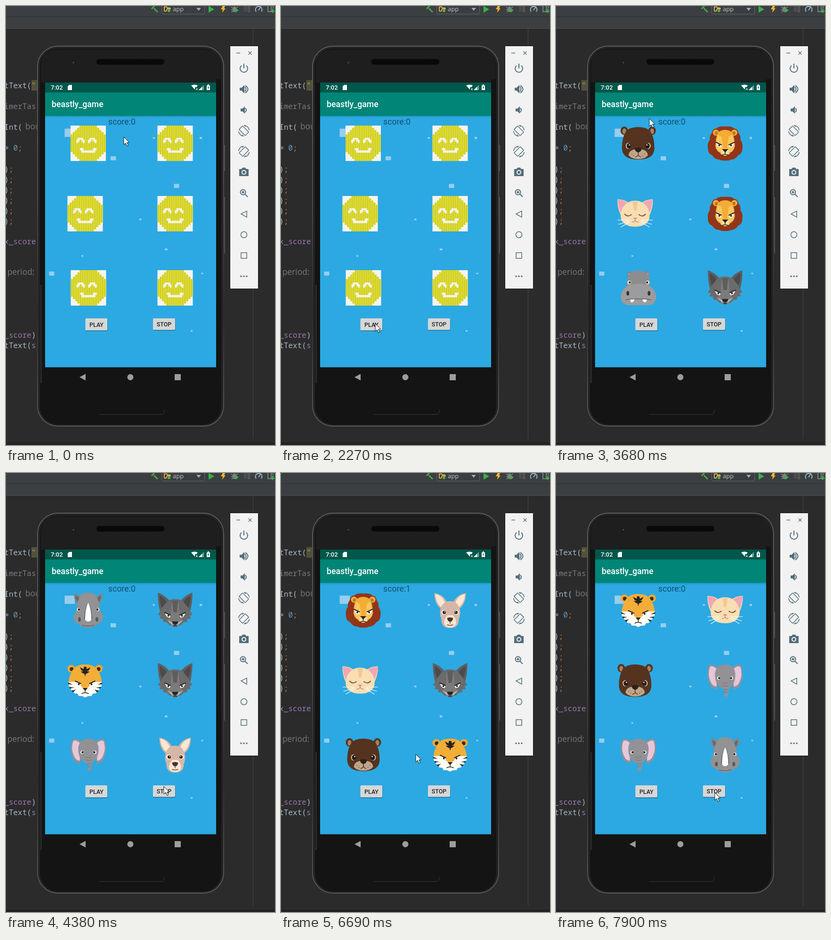
These frames come from a looping animation (571x929 px, 8 s). An HTML page:

```html
<!DOCTYPE html>
<html lang="en">
<head>
<meta charset="utf-8">
<title>Animal faces</title>
<style>
html, body { margin: 0; width: 100%; height: 100%; overflow: hidden; background: #2b2b2b; }
svg { display: block; }
.code { font: 16px "Noto Sans Mono", monospace; fill: #a9b7c6; white-space: pre; }
.hint { font: 17.3px "Open Sans", sans-serif; fill: #787878; }
.key { fill: #cc7832; }
.var { fill: #9876aa; }
.app { font: 500 13px Roboto, sans-serif; }
</style>
</head>
<body>
<svg width="571" height="929" viewBox="0 0 571 929">
  <defs>
    <linearGradient id="edge" x2="0" y2="1">
      <stop stop-color="#5c5c5c"/><stop offset=".4" stop-color="#4c4c4c"/>
      <stop offset=".7" stop-color="#2c2c2c"/><stop offset="1" stop-color="#5a5a5a"/>
    </linearGradient>
    <linearGradient id="shade" x2="0" y2="1">
      <stop stop-color="#2492bd"/><stop offset="1" stop-color="#2ca9e2"/>
    </linearGradient>
    <pattern id="stripes" width="4.7" height="75" patternUnits="userSpaceOnUse">
      <path fill="#dfdc2a" d="M0 0h5v75H0z"/><path fill="#c9c73a" d="M1 0h1.6v75H1z"/>
    </pattern>
    <pattern id="mesh" width="4" height="4" patternUnits="userSpaceOnUse">
      <path fill="#070707" d="M0 0h4v4H0z"/><path fill="#1c1c1c" d="M0 0h1v1H0zM2 2h1v1H2z"/>
    </pattern>
    <path id="rotate" fill="#546e7a" fill-rule="evenodd" d="M16.500 2.500c3.300 1.600 5.600 4.700 6 8.500H24C23.400 4.800 18.300 0 12 0h-.7l3.800 3.800zM10.200 1.700q-1-.9-2.100 0L1.700 8.100q-.9 1 0 2.100l12 12q1 .9 2.100 0l6.400-6.400q.9-1 0-2.100zM14.800 21.200L2.800 9.200l6.400-6.400 12 12zM7.500 21.500C4.200 19.900 1.900 16.800 1.500 13H0c.6 6.200 5.700 11 12 11h.7l-3.800-3.800z"/>
    <g id="symbols"></g>
  </defs>

  <!-- editor -->
  <path fill="#2b2b2b" d="M0 0h571v929H0z"/>
  <path fill="#3c3f41" d="M0 0h571v47H0z"/>
  <path fill="#2d2f30" d="M0 22h571v1H0z"/>
  <path fill="#515151" d="M0 47h571v1H0z"/>
  <path fill="#484848" d="M524 48h1v868h-1z"/>
  <path fill="#232323" d="M0 924h571v5H0z"/>
  <path fill="#53503a" d="M54 157h14v22H54z"/>
  <g id="code" class="code"></g>
  <text class="hint" x="41" y="261">bou</text>
  <text class="hint" x="3" y="569">period:</text>

  <!-- toolbar -->
  <rect x="330.5" y="-6" width="91" height="23" rx="3" fill="#3b3e40" stroke="#646768"/>
  <path fill="none" stroke="#d8a84e" stroke-width="2" d="M336 11V2h5l2 2h5v3M336 11h4l2-5h8"/>
  <circle cx="346" cy="10" r="3" fill="#4caf50"/>
  <text x="354" y="11" fill="#c4c7c9" style="font:13px 'Open Sans',sans-serif">app</text>
  <path fill="#a7aaac" d="M404 4h10l-5 6z"/>
  <path stroke="#49a64b" stroke-width="3" fill="none" d="M322 13l-8-8M309 6l6-6"/>
  <path fill="#35b34a" d="M430 0l12 7-12 7z"/>
  <path fill="#f5b52b" d="M460 0h5l-2 5h3l-7 9 1-7h-4z"/>
  <g fill="none" stroke="#8c9794" stroke-width="1.5">
    <path d="M478 2l4 3M478 8h4M479 13l4-3M492 2l-4 3M492 8h-4"/>
    <path stroke="#666" d="M505 2h6M505 6h6M505 10h6M514 0v12h3V0"/>
    <path stroke="#92b5c8" stroke-width="2" d="M531 12a7 7 0 1 1 11 0M536 9l4-6"/>
    <path d="M556 0v12h7V0M567 0v5"/>
  </g>
  <ellipse cx="485" cy="7" rx="4" ry="6" fill="#77867a"/>
  <path fill="#35b34a" d="M487 5l7 4-7 5zM565 6h3v4h3l-5 5-5-5h4z"/>

  <!-- phone -->
  <path fill="#4e4e4e" d="M463 294h2v55h-2zM463 404h2v120h-2z"/>
  <rect x="67" y="85" width="395" height="804" rx="43" fill="#232323" stroke="url(#edge)" stroke-width="2"/>
  <rect x="72" y="90" width="385" height="796" rx="39" fill="#141414"/>
  <path fill="#1e1e1e" d="M74 162v-31q0-39 39-39h304q39 0 39 39v24h-10v7z"/>
  <path fill="#2b2b2b" d="M73 590h3v208h-3z"/>
  <rect x="192" y="112" width="144" height="12" rx="5" fill="url(#mesh)"/>
  <circle cx="143" cy="120" r="1.5" fill="#555"/>
  <path fill="none" stroke="#3a3a3a" d="M198 864.500h132q6 0 6-10"/>
  <g fill="#9d9d9d">
    <path d="M156 785.500l13-7v14zM358 779h13v13h-13z"/><circle cx="264" cy="785.500" r="6.500"/>
  </g>

  <!-- app -->
  <path fill="#2ca9e2" d="M83 232h363v532.500H83z"/>
  <path fill="url(#shade)" d="M83 232h363v5H83z"/>
  <path fill="#00574b" d="M83 162h363v21H83z"/>
  <path fill="#008577" d="M83 183h363v49.500H83z"/>
  <g fill="#fff">
    <text class="app" x="95" y="177">7:02</text>
    <path d="M134 167h6v11h-9v-8zM393 168q7-3 14 0l-3 4h-3v5zM426 168h2v-2h3v2h2v10h-7z"/>
    <path d="M409 178l11-11v11z" opacity=".45"/><path d="M409 178l7-7v7z"/>
    <path stroke="#fff" d="M403 174l4 4M407 174l-4 4"/>
    <path fill="#00574b" d="M430 169l-2 4h1v3l2-4h-1z"/>
    <text x="97" y="214" style="font:500 17.7px Roboto,sans-serif">beastly_game</text>
  </g>
  <path fill="#98cdee" d="M124.500 259.500h21.500v17.500h-21.500zM222 318h11.500v8.500H222zM356.500 376.500h11v8.500h-11zM311.500 277.500h4.500v3.500h-4.500zM411 277h5v4.500h-5zM283 450h4.500v3.500H283zM337 513h5.500v4H337zM160 527.500h4v3h-4zM91.500 562h11v8.500h-11zM414.500 564.500h4v3h-4zM392 686h4v3h-4z"/>
  <text id="score" x="217" y="251" fill="#145071" style="font:17.7px Roboto,sans-serif"></text>
  <g id="faces"></g>
  <g class="app" text-anchor="middle" style="font-size:12.500px">
    <rect x="169" y="662" width="46.500" height="26" rx="2" fill="#1b6d94"/>
    <rect x="168.500" y="661" width="46.500" height="25.500" rx="2" fill="#d6d7d7"/>
    <rect x="312.500" y="662" width="47" height="25" rx="2" fill="#1b6d94"/>
    <rect x="312" y="661" width="47" height="24.500" rx="2" fill="#d6d7d7"/>
    <text x="192" y="679" fill="#222">PLAY</text><text x="335.500" y="678" fill="#222">STOP</text>
  </g>

  <!-- emulator controls -->
  <path fill="#f2f2f2" stroke="#161616" d="M475.500 84.500h60v514h-60z"/>
  <g fill="none" stroke="#546e7a" stroke-width="2">
    <path stroke-width="1.300" d="M489 99.500h8M514.500 96l7 7M521.500 96l-7 7"/>
    <path d="M500 126a8 8 0 1 0 10 0M505 122v10"/>
    <path d="M507 171q5 5 0 10M508 168q11 8 0 16M508 216q4 4 0 9"/>
    <circle cx="503" cy="394" r="5.500"/><path d="M507 398l6 6M500 394h6M503 391v6"/>
    <path stroke-width="1.500" d="M511 434v13l-12-7zM499 522h12v12h-12z"/>
    <circle cx="505" cy="484" r="6.500" stroke-width="1.500"/>
  </g>
  <use href="#rotate" x="493" y="252"/>
  <use href="#rotate" transform="matrix(-1 0 0 1 517 296)"/>
  <g fill="#546e7a">
    <path d="M496 173h4l6-6v18l-6-6h-4zM498 217h4l5-5v16l-5-5h-4zM495 345h5l2-3h6l2 3h5v15h-20z"/>
    <circle cx="499" cy="572" r="1.800"/><circle cx="505" cy="572" r="1.800"/><circle cx="511" cy="572" r="1.800"/>
  </g>
  <circle cx="505" cy="352" r="4" fill="#546e7a" stroke="#f2f2f2" stroke-width="2"/>
  <path id="cursor" fill="#fff" stroke="#111" d="M0 0v16.500l4-3.500 3 6.500 2.700-1.200-3-6.300h5z"/>
</svg>
<script>
const $ = id => document.getElementById(id);
const shape = (fill, d) => `<path fill="${fill}" d="${d}"/>`;
const oval = (fill, x, y, rx, ry = rx) => `<ellipse fill="${fill}" cx="${x}" cy="${y}" rx="${rx}" ry="${ry}"/>`;
const line = (color, d, w = 1.5) => `<path fill="none" stroke="${color}" stroke-width="${w}" d="${d}"/>`;
const pair = s => s + `<g transform="matrix(-1 0 0 1 75 0)">${s}</g>`;

// Disc built from a 16-row grid
let disc = '';
for (let i = 0; i < 16; i++) {
  const half = Math.round(Math.sqrt(70 - (i - 7.5) ** 2)) * 4.69;
  disc += `M${37.5 - half} ${i * 4.69}h${half * 2}v4.75h${-half * 2}z`;
}

// Angry eye with brow, left side
const glare = (x, y) => shape('#fff', `M${x} ${y}l12 6-2 4q-8 0-10-10z`) +
  oval('#222', x + 7, y + 6, 2) + line('#2b211c', `M${x - 1} ${y - 1}l13 6`, 2);

// Every face fills a 75 x 75 box
const art = {
  smile: shape('#f4f4ef', 'M0 0h75v75H0z') + shape('url(#stripes)', disc) +
    line('#f4f4e6', 'M14 37v-5h3v-4h8v4h3v5M39 37v-5h3v-4h8v4h3v5', 4) +
    line('#f4f4e6', 'M20 50h5v5h25v-5h5', 5),
  lion: shape('#933519', 'M37.500 2Q52 1 56 6q8 0 10 10 5 6 4 14 6 8 4 19 0 10-9 14-6 9-15 9-6 3-12.500 2-6.500 1-12.500-2-9 0-15-9-9-4-9-14-2-11 4-19-1-8 4-14Q11 6 19 6q4-5 18.500-4z') +
    pair(oval('#f2ad35', 18, 15, 6.5) + oval('#b87527', 19, 16, 3.5)) +
    shape('#f2ad35', 'M22 15q7-6 15.500-6T53 15q5 12 5 28-2 11-9 14-4 7-11.500 7T26 57q-7-3-9-14 0-16 5-28z') +
    pair(shape('#f9c65f', 'M22 19l8 5 3 23-6 10q-8-3-10-14z')) +
    pair(glare(18, 36)) + shape('#f8dca5', 'M28 53l9.500-3 9.500 3-2 8-7.500 3-7.500-3z') +
    shape('#2b211c', 'M31 50h13l-6.500 7z') + line('#2b211c', 'M37.500 55v5M30 63q7-4 15 0'),
  hippo: pair(oval('#858587', 18, 8, 4, 6) + oval('#c2a7a8', 18, 9, 1.7, 3)) +
    shape('#8d8d8f', 'M18 8q19-15 39 0 5 12 6 28H12q1-16 6-28z') +
    shape('#9c9b9d', 'M17 32q20-6 41 0 17 9 17 25-1 17-18 17H18Q1 74 0 57q0-16 17-25z') +
    pair(oval('#e9e6e2', 18, 26, 4) + oval('#222', 19, 26, 2.2) + oval('#343436', 15, 49, 3, 5) +
      shape('#fff', 'M20 62l9-1q-1 7-5 7t-4-6z')) +
    line('#636264', 'M10 63q13-3 27.500-2Q52 60 65 63'),
  wolf: pair(shape('#5f5f60', 'M1 0q15 5 27 20L6 42Q0 19 1 0z') + shape('#4b4b4c', 'M5 6q9 5 16 15L9 32Q4 18 5 6z')) +
    shape('#6b6b6c', 'M21 18q16-9 33 0l11 14 9 15-6 2 3 6-8 1 0 6-8 1-5 6-7 1-5.500 4-5.500-4-7-1-5-6-8-1 0-6-8-1 3-6-6-2 9-15z') +
    shape('#7b7b7c', 'M30 20h15l2 27 7 13-9 9-7.500 5-7.500-5-9-9 7-13z') +
    shape('#5d5d5e', 'M31 17h13l-3 25h-7z') + pair(glare(16, 43) + shape('#b8b8b9', 'M20 58l11 5 2 7z')) +
    shape('#262627', 'M31 61h13q-1 6-6.500 7-5.500-1-6.500-7z') + line('#262627', 'M37.500 67v3l-4 1M37.500 70l4 1'),
  pig: pair(shape('#f09cb2', 'M0 11q12-6 25-1L9 32Q2 24 0 11z') + shape('#dc7895', 'M5 14q8-2 13 1L9 26q-3-4-4-12z')) +
    shape('#f7b3c5', 'M37.500 6Q55 6 61 20q7 10 6 23-4 22-29.500 22T8 43q-1-13 6-23Q20 6 37.500 6z') +
    pair(oval('#fff', 25, 35, 8.5) + oval('#503839', 26, 35, 1.8)) +
    oval('#ee8ba5', 37.5, 50, 14, 9) + pair(oval('#b84670', 32, 50, 3, 4)) + line('#cb6482', 'M33 61q4 2 9 0'),
  tiger: pair(oval('#f1a72f', 8, 12, 8) + oval('#3b2a20', 9, 13, 4)) +
    shape('#f3ae38', 'M37.500 3Q57 3 64 15q8 12 9 28l-9 14H11L2 43Q3 27 11 15 18 3 37.500 3z') +
    shape('#fffdf6', 'M2 40l14 0 13 7 8.500-6 8.500 6 13-7 14 0-1 10-5 1 1 6-6 1-1 6-7 1-3 5-7 0-6.500 3-6.500-3-7 0-3-5-7-1-1-6-6-1 1-6-5-1z') +
    shape('#f3ae38', 'M30 25h15l2 24-9.500 7L28 49z') +
    shape('#292420', 'M35 8h5l1 5 8-4-4 7-4 2 6 0-5 4-3 1-1.500 6-1.500-6-3-1-5-4 6 0-4-2-4-7 8 4z') +
    pair(shape('#292420', 'M1 41l10 5-9-1zM4 51l11 1-10 2zM9 59l9-3-6 6z') + glare(17, 39)) +
    shape('#292420', 'M32 53h11l-5.500 6z') + line('#292420', 'M37.500 57v5M30 65q7-4 15 0'),
  bear: pair(oval('#56331f', 8, 11, 8, 9) + oval('#a98261', 8, 12, 4, 6)) +
    shape('#56331f', 'M37.500 3Q56 3 64 13q8 14 8 34 0 25-34.500 25T3 47Q3 27 11 13 19 3 37.500 3z') +
    shape('#c0a58b', 'M32 50h11q14 2 15 13-7 8-20.500 8T17 63q1-11 15-13z') +
    pair(oval('#d7c2a9', 16, 43, 5, 6.5) + oval('#231d1a', 17.5, 43, 4.5, 5.5) + oval('#fff', 19, 41, 1.3) +
      oval('#705b49', 24, 60, 1) + oval('#705b49', 28, 64, 1)) +
    shape('#2c211c', 'M30 48q7-3 15 0-1 8-7.500 9-6.500-1-7.500-9z') + line('#4a3526', 'M37.500 57v6l-6 4M37.500 63l6 4'),
  cat: pair(shape('#f7d7a7', 'M0 7q14-1 27 10L7 41Q-1 24 0 7z') + shape('#f3a5b5', 'M1 8q13 0 22 9L8 37Q1 23 1 8z')) +
    shape('#f9deb2', 'M37.500 10Q56 10 65 27q6 16 1 25-8 13-28.500 13T9 52q-5-9 1-25 9-17 27.500-17z') +
    shape('#f1c895', 'M32 12h11l-3 19h-5z') +
    pair(line('#76584b', 'M15 38q7 8 15 1', 2) + line('#fff', 'M25 51L0 51M25 53L2 60M26 55L7 66', 1.2)) +
    shape('#e98194', 'M33 46h9l-4.500 5z') + line('#8c6658', 'M37.500 51q-1 5-7 4M37.500 51q1 5 7 4', 1),
  rhino: pair(shape('#858588', 'M8 2q11 1 15 13l-9 9Q5 12 8 2z') + shape('#696769', 'M11 6q7 3 8 10l-4 4Q10 13 11 6z')) +
    shape('#929194', 'M24 3q13-6 27 0 9 11 11 27-1 9 7 19 0 14-11 17-7 8-20.500 9Q24 74 17 66 6 63 6 49q8-10 7-19 2-16 11-27z') +
    pair(oval('#ddd', 17, 36, 3.5) + oval('#222', 18, 36, 2.2) + oval('#575659', 19, 57, 3, 5)) +
    shape('#77767a', 'M28 57q2-25 9.500-37Q45 32 47 57z') +
    shape('#fff', 'M31 58q0-24 6.500-37Q44 34 44 58q-6.500 7-13 0z') + line('#67666a', 'M24 69q13 4 27 0'),
  elephant: pair(shape('#929196', 'M24 11Q10-1 3 6q-6 16 0 34 4 14 17 16z') + shape('#e5c6da', 'M21 14Q10 3 5 9q-5 15 1 29 4 11 13 12z')) +
    shape('#929196', 'M37.500 3Q57 4 59 22q1 23-13 31l-3 17q-4 3-8 0l2-4 1-8-9-5Q15 45 16 22 18 4 37.500 3z') +
    pair(oval('#eee', 24, 32, 3.5) + oval('#242326', 25, 32, 2.3)) +
    line('#747378', 'M31 42q6 3 13 0M31 48q6 3 13 0M35 56h8M36 62h7', 1),
  kangaroo: pair(shape('#d4b5a3', 'M4 1q20 3 28 22L20 36Q4 25 4 1z') + shape('#fbe7d4', 'M6 3q16 4 21 20l-7 9Q7 22 6 3z')) +
    shape('#d6b7a6', 'M37.500 18Q51 18 56 30q6 13 0 27 0 18-18.500 18T19 57q-6-14 0-27 5-12 18.500-12z') +
    shape('#f8e5d4', 'M32 48h11q9 9 7 19-4 7-12.500 7T25 67q-2-10 7-19z') +
    pair(oval('#fff3e5', 24, 42, 5) + oval('#2c2421', 25, 42, 3.6) + oval('#fff', 26, 41, 1)) +
    shape('#47342e', 'M31 54q6-3 13 0-1 7-6.500 8-5.500-1-6.500-8z') + line('#6d5147', 'M37.500 61v5M31 68q6 3 13 0'),
};
$('symbols').innerHTML = Object.entries(art).map(([name, body]) => `<g id="${name}">${body}</g>`).join('');

const spots = [[137, 253], [321.5, 253], [130.5, 402], [321.5, 402], [137.5, 559], [321.5, 559]];
$('faces').innerHTML = spots.map(([x, y]) => `<use x="${x}" y="${y}"/>`).join('');

const row = (y, s) => `<text x="-3.7" y="${y}">${s}</text>`;
const span = (c, s) => `<tspan class="${c}">${s}</tspan>`;
$('code').innerHTML = row(174, 'tText(<tspan fill="#a5a35c">"</tspan>') +
  row(218, '<tspan fill="#777b80">imerTas</tspan>') + row(262, 'Int(') +
  row(306, `= <tspan fill="#6897bb">0</tspan>${span('key', ';')}`) +
  [0, 1, 2, 3, 4, 5].map(i => row(351 + i * 22, ')' + span('key', ';'))).join('') +
  row(504, span('var', 'x_score')) + row(702, span('var', '_score') + ')') +
  row(724, 'tText(' + span('var', 's'));

// Start time, then the six faces
const deals = [
  [0, 'smile smile smile smile smile smile'],
  [2660, 'cat tiger bear rhino wolf elephant'],
  [3160, 'lion hippo wolf pig tiger lion'],
  [3670, 'bear lion cat lion hippo wolf'],
  [4180, 'rhino wolf tiger wolf elephant kangaroo'],
  [4640, 'lion kangaroo cat wolf bear tiger'],
  [7250, 'hippo bear rhino lion cat pig'],
  [7720, 'tiger cat bear elephant elephant rhino'],
];

// Time, x, y of the pointer
const track = [
  [0, 250, 277], [260, 320, 250], [390, 342, 300], [650, 200, 232], [780, 149, 290],
  [1040, 230, 421], [1300, 297, 560], [1560, 250, 714], [1820, 181, 685], [2080, 200, 672],
  [2470, 200, 672], [2860, 199, 660], [3250, 199, 660], [3640, 198, 238], [3770, 215, 213],
  [4030, 350, 560], [4160, 385, 690], [4290, 335, 663], [5070, 335, 663], [5590, 231, 244],
  [5850, 231, 244], [5980, 260, 222], [6240, 337, 350], [6630, 286, 595], [6760, 235, 690],
  [6890, 185, 672], [7150, 185, 672], [7670, 337, 680], [7800, 337, 676], [8000, 337, 676],
];

const TICK = 130;
function pointer(t) {
  t = Math.floor(t / TICK) * TICK;
  const i = track.findIndex(k => k[0] > t);
  const [t0, x0, y0] = track[i - 1], [t1, x1, y1] = track[i];
  const p = (t - t0) / (t1 - t0);
  return [x0 + (x1 - x0) * p, y0 + (y1 - y0) * p];
}

let shown;
function draw(now) {
  const t = now % 8000;
  const deal = deals.findLast(d => d[0] <= t);
  if (deal !== shown) {
    shown = deal;
    deal[1].split(' ').forEach((name, i) => $('faces').children[i].setAttribute('href', '#' + name));
  }
  $('score').textContent = 'score:' + (t >= 4640 && t < 7250 ? 1 : 0);
  $('cursor').setAttribute('transform', `translate(${pointer(t)})`);
  requestAnimationFrame(draw);
}
draw(0);
</script>
</body>
</html>
```
